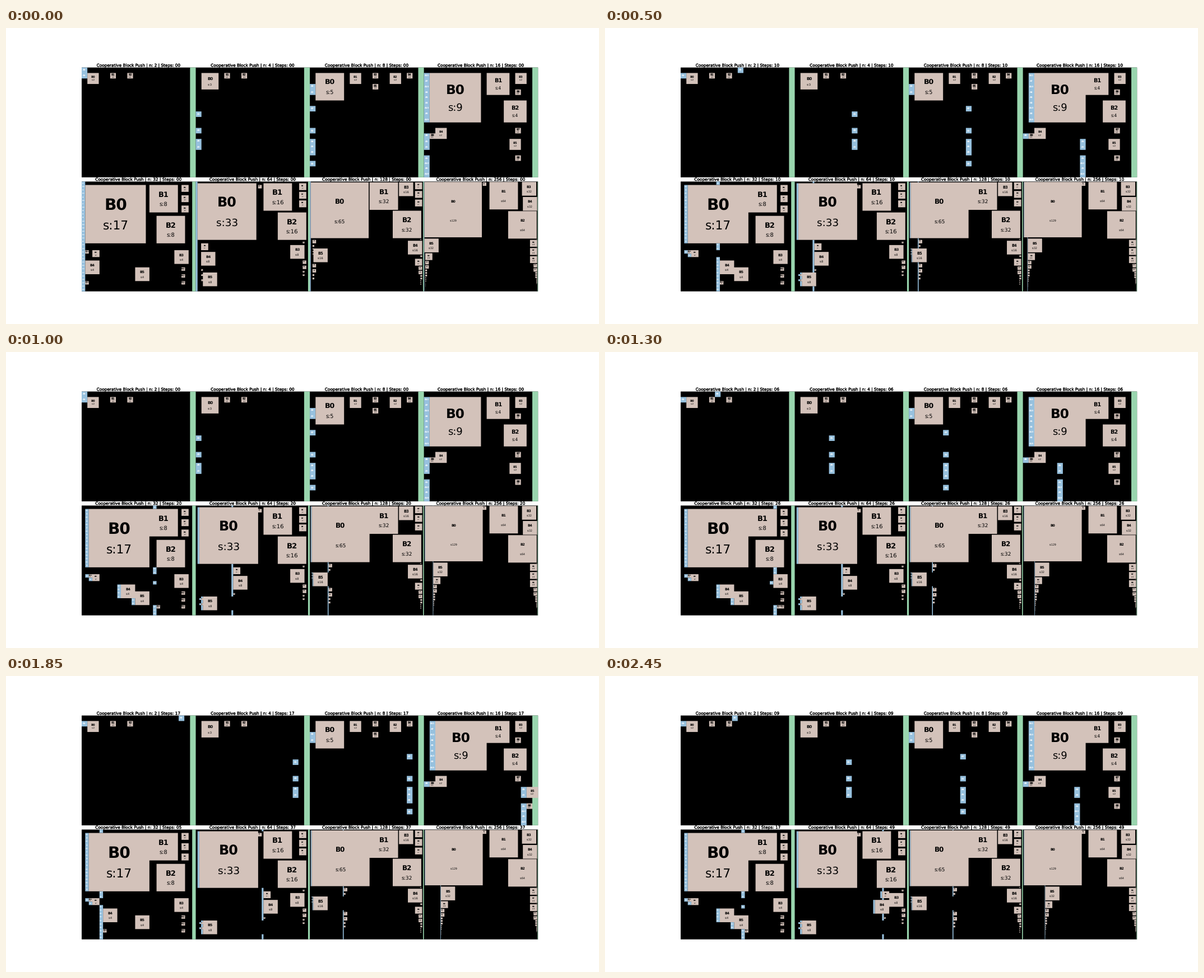
These frames come from a looping animation (1058 px wide and 529 px high, 2500 ms). A matplotlib script:

```python
import random

import matplotlib.pyplot as plt
import numpy as np
from matplotlib.animation import FuncAnimation
from matplotlib.patches import PathPatch, Rectangle
from matplotlib.path import Path
from matplotlib.patheffects import withStroke

W, H, DPI = 1058, 529, 100
FRAMES, INTERVAL = 50, 50
LEFT, TOP = 135, 70.6
PITCH_X, PITCH_Y, HEIGHT = 203.55, 203.8, 196.3
BLOCK, AGENT, GOAL = "#d3c2ba", "#97c1de", "#99d5ae"

plt.rcParams.update({"font.family": "DejaVu Sans", "text.hinting": "none"})
fig = plt.figure(figsize=(W / DPI, H / DPI), dpi=DPI, facecolor="white")
ax = fig.add_axes([0, 0, 1, 1])
ax.set(xlim=(0, W), ylim=(H, 0))
ax.axis("off")


def rect_path(boxes):
    """One compound path, so that touching boxes leave no seam."""
    verts, codes = [], []
    for x, y, w, h in boxes:
        verts += [(x, y), (x + w, y), (x + w, y + h), (x, y + h), (x, y)]
        codes += [Path.MOVETO] + [Path.LINETO] * 3 + [Path.CLOSEPOLY]
    return Path(verts, codes)


def label(text, px, color="black", weight="normal", va="center"):
    return ax.text(0, 0, text, fontsize=px * 72 / DPI, color=color,
                   weight=weight, ha="center", va=va, zorder=5)


def name_size(s):
    """Label height in cells for a block of side s."""
    return min(max(.38 + .07 * s, .265 * s - .1), 7.5)


def block_sides(n):
    """One block over half of n, then ever more blocks of ever halved side."""
    yield n // 2 + 1
    side, count = max(n // 4, 1), 2
    while side:
        yield from [side] * count
        side, count = side // 2, count + 1


def layout(n, grid, key_points):
    """Key points place the big blocks; small ones stack up at both edges."""
    first, *sides = block_sides(n)
    blocks = []
    taken = np.zeros((grid, grid), bool)

    def add(x, y, s):
        blocks.append((x, y, s))
        taken[y:y + s, x:x + s] = True

    def stack(x, s, start, gap):
        for y in range(start, grid - s):
            if not taken[max(y - gap, 0):y + s + 1, x:x + s].any():
                return add(x, y, s)

    add(1, 1, first)
    for (x, y), s in zip(key_points, sides):
        add(x, y, s)

    edge = first + 1
    slot = key_points[0][0] - edge
    wedged, placed = False, 0
    for s in sides[len(key_points):]:
        if not wedged and 2 * s <= slot:
            add(edge + max(1, slot // 8), 2, s)
            wedged = True
            continue
        if placed < 3 or placed % 2 == 0:
            stack(grid - max(s, 2) - 2, s, 1 if placed < 3 else grid // 2, 1 + s // 8)
        else:
            stack(min(3, s * grid // 20), s, edge, 2)
        placed += 1
    return blocks


def simulate(grid, rows, blocks, steps):
    """Agents walk right; a block of side s moves when s agents push it."""
    agents = {r: 0 for r in rows}
    xs = [b[0] for b in blocks]
    history = []
    for _ in range(steps):
        history.append((dict(agents), list(xs)))
        solid = np.zeros((grid, grid + 1), bool)
        solid[:, grid] = True
        for x, (_, y, s) in zip(xs, blocks):
            solid[y:y + s, x:x + s] = True
        for i, (_, y, s) in enumerate(blocks):
            x = xs[i]
            pushed = all(agents.get(r) == x - 1 for r in range(y, y + s))
            if pushed and not solid[y:y + s, x + s].any():
                solid[y:y + s, x] = False
                solid[y:y + s, x + s] = True
                xs[i] += 1
        for r, c in agents.items():
            if not solid[r, c + 1]:
                agents[r] = c + 1
    return history


class Panel:
    def __init__(self, index, key_points, rows=None):
        self.n = n = 2 ** (index + 1)
        self.grid = max(n, 20)
        self.x0 = LEFT + index % 4 * PITCH_X
        self.y0 = TOP + index // 4 * PITCH_Y
        self.cw, self.ch = PITCH_X / self.grid, HEIGHT / self.grid
        self.blocks = layout(n, self.grid, key_points)
        rows = rows or range(n)
        self.history = simulate(self.grid, rows, self.blocks, min(self.grid, FRAMES))

        ax.add_patch(Rectangle((self.x0 + PITCH_X - self.cw, self.y0), self.cw, HEIGHT,
                               fc=GOAL, lw=0, snap=False, zorder=2))
        self.agent_patch = self.shape(AGENT)
        self.block_patch = self.shape(BLOCK)
        self.title = label("", 7.33, va="baseline")
        self.title.set_position((self.x0 + PITCH_X / 2, self.y0 - 1.4))
        self.title.set_path_effects([withStroke(linewidth=.2, foreground="black")])

        self.agent_labels = {}
        if n <= 32:
            ids = random.Random(n).sample(range(n), n)
            self.agent_labels = {r: label(f"A{i}", .37 * self.cw, "white", "bold")
                                 for r, i in zip(rows, ids)}
        self.block_labels = []
        for i, (_, _, s) in enumerate(self.blocks):
            px = name_size(s) * self.cw
            if px > 1.2:
                self.block_labels.append(
                    (i, label(f"B{i}", px, weight="bold"), label(f"s:{s}", .77 * px)))

    def shape(self, color):
        return ax.add_patch(PathPatch(rect_path([(0, 0, 0, 0)]), fc=color, lw=0,
                                      snap=False, zorder=3))

    def at(self, col, row):
        return self.x0 + col * self.cw, self.y0 + row * self.ch

    def box(self, col, row, s=1):
        return (*self.at(col, row), s * self.cw, s * self.ch)

    def show(self, frame):
        step = frame % len(self.history)
        agents, xs = self.history[step]
        self.agent_patch.set_path(rect_path([self.box(c, r) for r, c in agents.items()]))
        self.block_patch.set_path(rect_path(
            [self.box(x, y, s) for x, (_, y, s) in zip(xs, self.blocks)]))
        for r, text in self.agent_labels.items():
            text.set_position(self.at(agents[r] + .5, r + .5))
        for i, name, size in self.block_labels:
            _, y, s = self.blocks[i]
            name.set_position(self.at(xs[i] + s / 2, y + .355 * s))
            size.set_position(self.at(xs[i] + s / 2, y + .705 * s))
        self.title.set_text(f"Cooperative Block Push | n: {self.n} | Steps: {step:02d}")


for top in (TOP, TOP + PITCH_Y):
    ax.add_patch(Rectangle((LEFT, top), 4 * PITCH_X, HEIGHT, fc="black", lw=0,
                           snap=False, zorder=1))

# Key points are the (column, row) cells of the biggest blocks after B0.
panels = [
    Panel(0, [(5, 1), (8, 1)]),
    Panel(1, [(5, 1), (8, 1)], [8, 11, 13, 14]),
    Panel(2, [(7, 1), (14, 1), (11, 1), (17, 1), (11, 3)],
          [3, 4, 7, 11, *range(13, 16), 17]),
    Panel(3, [(11, 1), (14, 6), (16, 1), (2, 11), (15, 13)],
          [*range(1, 10), *range(12, 15), *range(16, 20)]),
    Panel(4, [(19, 1), (21, 10), (26, 20), (1, 23), (15, 25)]),
    Panel(5, [(38, 1), (46, 18), (53, 37), (3, 41), (4, 53)]),
    Panel(6, [(67, 1), (93, 34), (100, 1), (110, 69), (4, 78), (118, 90)]),
    Panel(7, [(147, 1), (189, 69), (220, 1), (222, 36), (1, 133)]),
]


def update(frame):
    for panel in panels:
        panel.show(frame)
    return []


anim = FuncAnimation(fig, update, frames=FRAMES, interval=INTERVAL, repeat=True,
                     repeat_delay=0, init_func=lambda: update(0))
plt.show()
```
